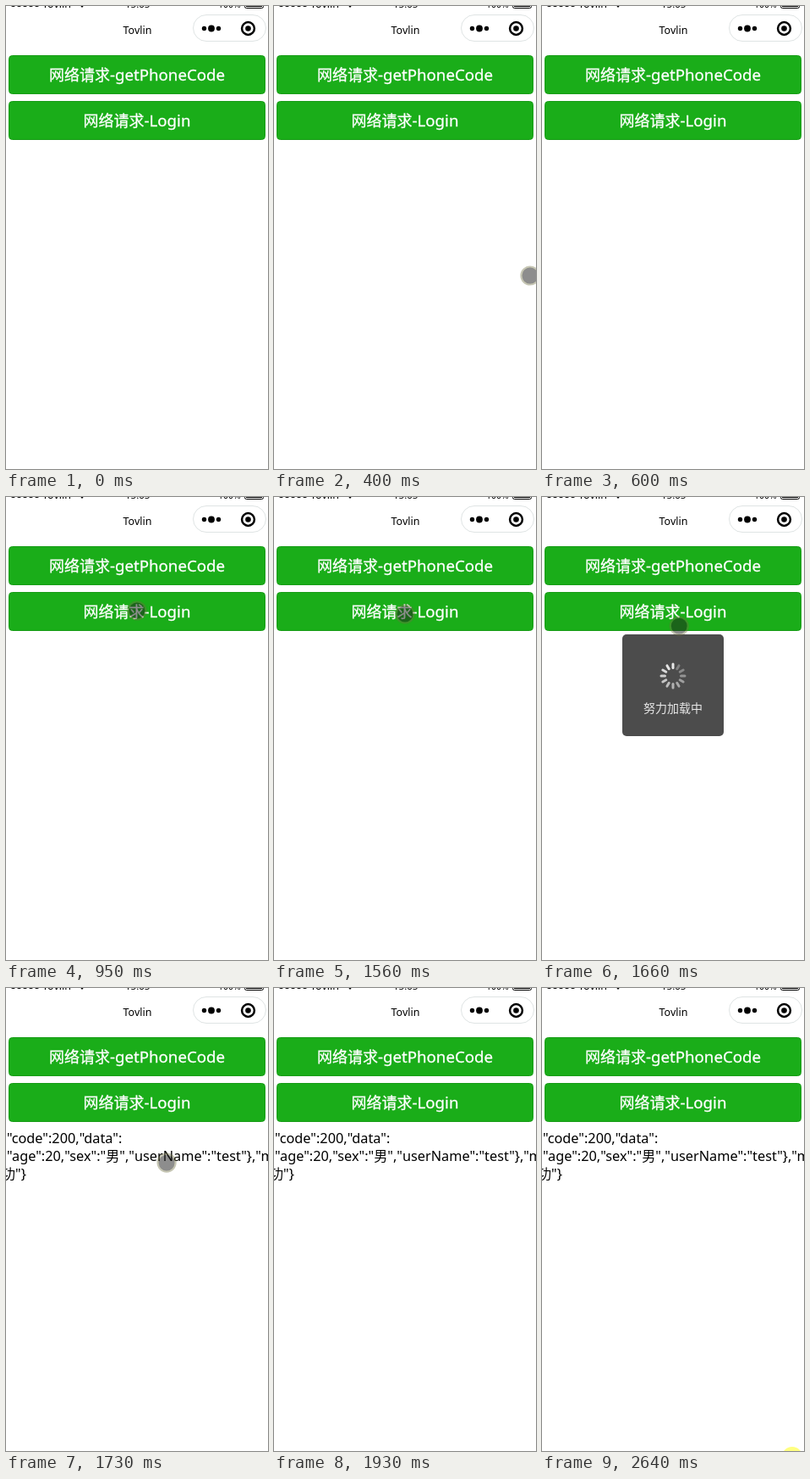
Animation of 310 by 546 pixels, one loop 2690 ms. Source, as an HTML page:

```html
<!DOCTYPE html>
<html lang="zh-CN">
<head>
<meta charset="utf-8">
<style>
  html, body { margin: 0; width: 100%; height: 100%; overflow: hidden; background: #fff; }
  svg { display: block; width: 310px; height: 546px; font-family: "Noto Sans", "Noto Sans CJK SC", "Noto Sans CJK", sans-serif; }
  .button rect { fill: #1aad19; stroke: #179c16; }
  .button text { font-size: 18.7px; fill: #fff; stroke: #fff; stroke-width: .3; text-anchor: middle; }
  .button tspan { font-size: 18px; }
  .pressed rect { fill: #179b16; stroke: #148a13; }
  .pressed text { opacity: .6; }
  .json { font-size: 16.3px; }
  .json tspan { font-size: 16px; }
  .hidden { display: none; }
</style>
</head>
<body>
<svg viewBox="0 0 310 546">
  <!-- status bar, cut by the top edge -->
  <g id="signal"></g>
  <text x="43" y="2" font-size="12.5">Tovlin</text>
  <path d="M86-3h8l-4 5z"/>
  <text x="141" y="2" font-size="11.5">15:05</text>
  <text x="251" y="2" font-size="10.5">100%</text>
  <rect x="282.5" y="-8" width="22" height="10.5" rx="2" fill="none" stroke="#000"/>
  <path d="M284-6h19v7h-19z"/>

  <text x="155.5" y="33" font-size="12.5" text-anchor="middle">Tovlin</text>

  <rect x="221.5" y="10.5" width="86" height="31" rx="15.5" fill="#fff" stroke="#dfe4e4"/>
  <circle cx="234.5" cy="26.5" r="2.7"/>
  <circle cx="243" cy="26.5" r="3.9"/>
  <circle cx="251.5" cy="26.5" r="2.7"/>
  <circle cx="286.5" cy="26.5" r="7.4" fill="none" stroke="#000" stroke-width="2.5"/>
  <circle cx="286.5" cy="26.5" r="3.3"/>

  <g class="button">
    <rect x="3.5" y="58.5" width="303" height="45" rx="4"/>
    <text x="155" y="88"><tspan>网络请求</tspan>-getPhoneCode</text>
  </g>
  <g class="button" id="login">
    <rect x="3.5" y="112.5" width="303" height="45" rx="4"/>
    <text x="155" y="142"><tspan>网络请求</tspan>-Login</text>
  </g>

  <g class="json" id="reply">
    <text x="1" y="183">"code":200,"data":</text>
    <text x="1" y="204">"age":20,"sex":"<tspan>男</tspan>","userName":"test"},"msg":</text>
    <text x="-5" y="225"><tspan>功</tspan>"}</text>
  </g>

  <g id="toast">
    <rect x="95" y="162" width="120" height="120" rx="5" fill="#4c4c4c"/>
    <g id="spinner" stroke-width="3" stroke-linecap="round"></g>
    <text x="155" y="254" font-size="14" fill="#e6e6e6" text-anchor="middle">努力加载中</text>
  </g>

  <g id="cursor">
    <circle r="10.4" fill="none" stroke="#6e6e40" stroke-opacity=".4" stroke-width="2.4"/>
    <circle r="9.4" fill="#1c1c1c" fill-opacity=".5"/>
  </g>
  <circle id="halo" cx="296" cy="553.5" r="12.5" fill="#ffff80"/>
</svg>
<script>
const LOOP = 2690, STEP = 50;
const $ = id => document.getElementById(id);
const show = (id, on) => $(id).classList.toggle('hidden', !on);
const mix = (a, b, p) => a + (b - a) * p;
const progress = (t, from, to) => Math.min(1, Math.max(0, (t - from) / (to - from)));

for (let i = 0; i < 5; i++)
  $('signal').innerHTML += `<circle cx="${8.5 + i * 7}" cy="-2" r="3"/>`;

for (let i = 0; i < 12; i++) {
  const shade = i ? 118 + i * 10 : 233;
  $('spinner').innerHTML += `<path d="M0-9.5v-4.5" stroke="rgb(${shade},${shade},${shade})"
    transform="translate(155 211) rotate(${i * 30})"/>`;
}

// The pointer curves in with a slowing pace, sinks a little, then speeds off.
function pointerAt(t) {
  const enter = Math.sin(progress(t, 400, 950) * Math.PI / 2);
  const sink = progress(t, 1210, 1310);
  const leave = progress(t, 1610, 1880) ** 1.8;
  const curve = (a, b, c) => mix(mix(a, b, enter), mix(b, c, enter), enter);
  return [
    mix(curve(303, 247, 155), 306, leave),
    mix(curve(318, 176, 134) + 4 * sink, 431, leave)
  ];
}

function draw(now) {
  const t = now % LOOP;
  const within = (from, to) => t >= from && t < to;

  // Each movement advances in even steps counted from its own beginning.
  const origin = [0, 400, 1260, 1730].findLast(o => o <= t);
  const stepped = origin + Math.floor((t - origin) / STEP) * STEP;
  $('cursor').setAttribute('transform', `translate(${pointerAt(stepped)})`);

  show('cursor', within(400, 600) || within(700, 1930));
  $('login').classList.toggle('pressed', within(1610, 1660));
  show('toast', within(1610, 1730));
  show('reply', t >= 1730);
  show('halo', t >= 2640);
}

const start = performance.now();
function tick() {
  draw(performance.now() - start);
  requestAnimationFrame(tick);
}
tick();
</script>
</body>
</html>
```
